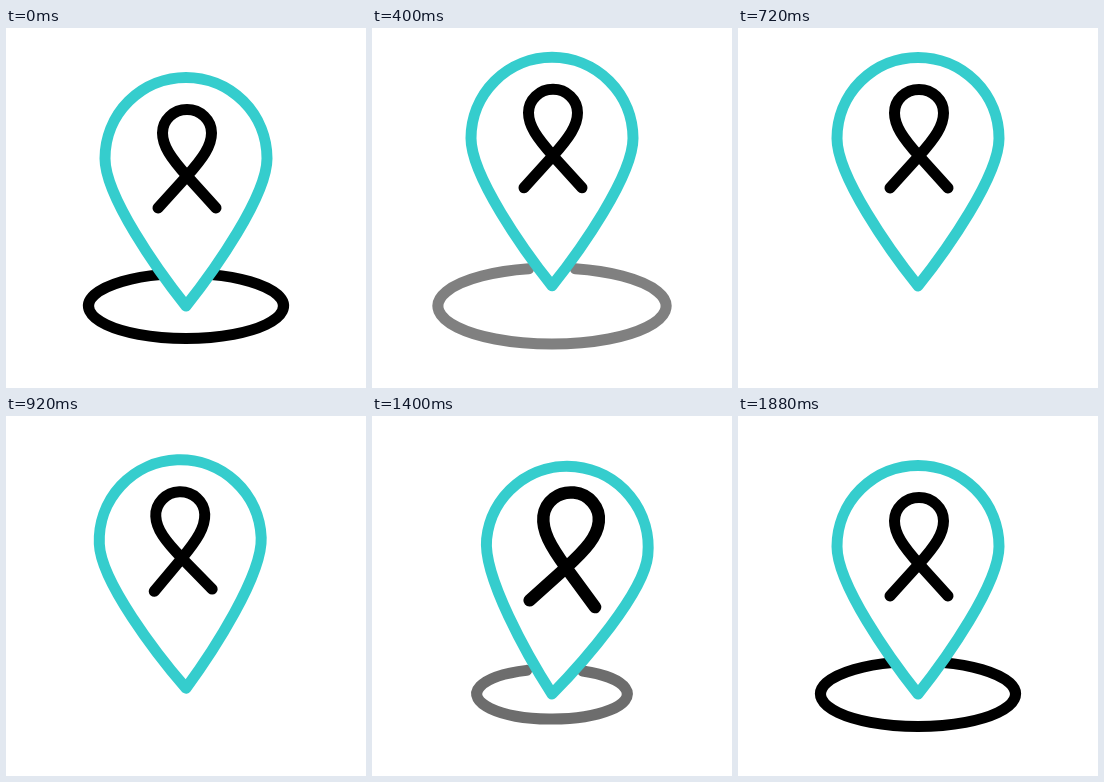
Recreate the animation shown at these times as an HTML page. Size 360x360 px, loop 2 s.

```html
<!DOCTYPE html>
<html lang="en">
<head>
<meta charset="utf-8">
<title>Map pin with ribbon</title>
<style>
  html, body { margin: 0; width: 100%; height: 100%; overflow: hidden; background: #fff; }
  svg { display: block; width: 100vw; height: 100vh; }
  path { fill: none; stroke: #000; stroke-width: 11; stroke-linecap: round; stroke-linejoin: round; }
  #drop { stroke: #35cdcd; }
</style>
</head>
<body>
<svg viewBox="0 0 360 360">
  <path id="ring"/>
  <g id="pin">
    <path id="drop" d="M180 278C152 243 99 168 99 130.5A81 81 0 0 1 261 130.5C261 168 208 243 180 278Z"/>
    <path id="ribbon" d="M152 180L181 148C197 130 205.5 118 205.5 105A24.5 23.5 0 0 0 156.5 105C156.5 118 165 130 181 148L210 180"/>
  </g>
</svg>
<script>
const LOOP = 2000;
const TIP = { x: 180, y: 278 };

// Keyframes are [time in ms, value], eased in and out between neighbours.
const lift = [[40, 0], [560, -26], [1080, 0]];
const tilt = [[760, 0], [1180, -6.8], [1430, 6.4], [1880, 0]];
const ribbonScale = [[1040, 1], [1450, 1.14], [1880, 1]];
const ringOut = { radius: [[120, 97.5], [680, 130.5]], opacity: [[120, 1], [680, 0]] };
const ringIn = { radius: [[1000, 45.5], [1730, 97.5]], opacity: [[1000, 0], [1730, 1]] };

const byId = id => document.getElementById(id);
const ring = byId('ring'), pin = byId('pin'), ribbon = byId('ribbon');

function valueAt(keys, time) {
  if (time <= keys[0][0]) return keys[0][1];
  for (let i = 1; i < keys.length; i++) {
    const [t0, a] = keys[i - 1], [t1, b] = keys[i];
    if (time < t1) {
      const u = (time - t0) / (t1 - t0);
      return a + (b - a) * u * u * (3 - 2 * u);
    }
  }
  return keys[keys.length - 1][1];
}

// An ellipse left open behind the pin; the opening leans with it.
function ringPath(rx, angle) {
  const ry = rx / 3;
  const gap = 37 - rx * 0.12;
  const lean = angle * 0.45;
  const end = dx => `${TIP.x + dx} ${TIP.y - ry * Math.sqrt(1 - (dx / rx) ** 2)}`;
  return `M${end(lean - gap)}A${rx} ${ry} 0 1 0 ${end(lean + gap)}`;
}

function draw(time) {
  const phase = time < 840 ? ringOut : ringIn;
  const angle = valueAt(tilt, time);
  ring.setAttribute('d', ringPath(valueAt(phase.radius, time), angle));
  ring.setAttribute('opacity', valueAt(phase.opacity, time));

  pin.setAttribute('transform',
    `translate(0 ${valueAt(lift, time)}) rotate(${angle} ${TIP.x} ${TIP.y})`);
  ribbon.setAttribute('transform',
    `translate(181 127) scale(${valueAt(ribbonScale, time)}) translate(-181 -127)`);
}

const start = performance.now();
function tick() {
  draw((performance.now() - start) % LOOP);
  requestAnimationFrame(tick);
}
tick();
</script>
</body>
</html>
```
